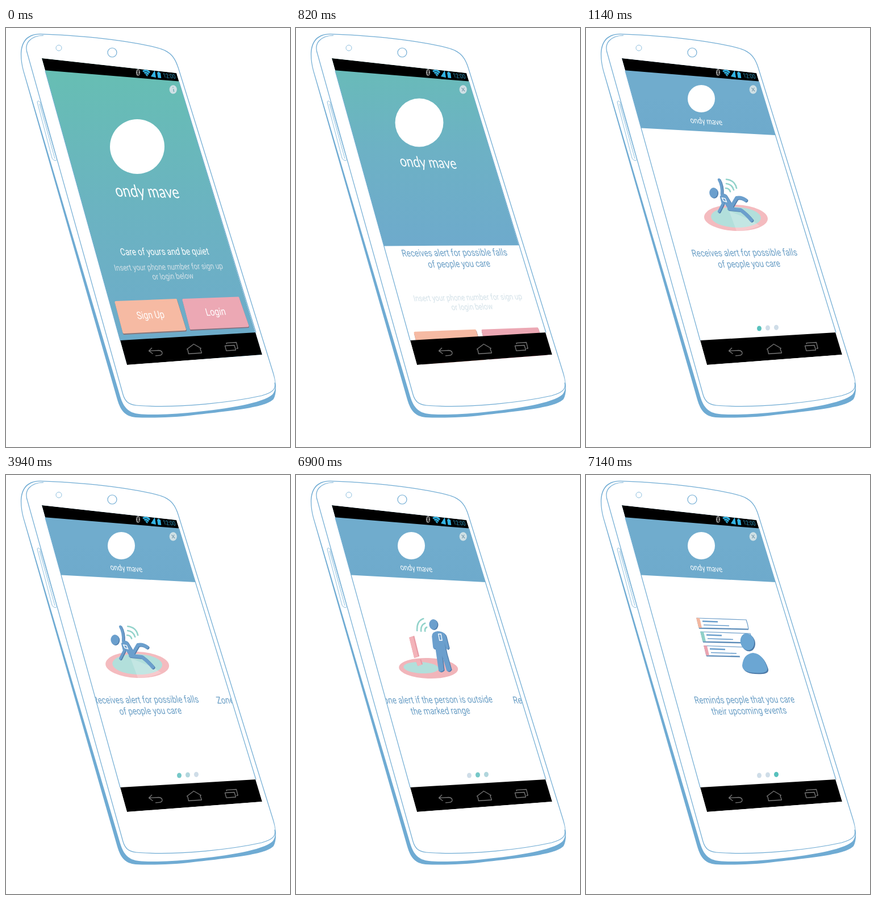
These frames come from a looping animation (500x735 px, 8 s). An HTML page:

```html
<!DOCTYPE html>
<html lang="en">
<head>
<meta charset="utf-8">
<title>Care app tour</title>
<style>
  html, body { margin: 0; height: 100%; overflow: hidden; background: #fff; }
  svg { display: block; width: 100vw; height: 100vh; }
  text { font-family: Roboto, "Open Sans", sans-serif; text-anchor: middle; }
  .line { fill: none; stroke: #6fabd3; stroke-width: 1.2; }
  .thin { fill: #fff; stroke: #8fc0df; stroke-width: 1; }
  .wave { fill: none; stroke: #93d3cb; stroke-width: 2.6; stroke-linecap: round; }
  .nav { fill: none; stroke: #777; stroke-width: 1.3; stroke-linejoin: round; }
  .limb { fill: none; stroke: currentColor; stroke-linecap: round; stroke-linejoin: round; }
  .dark { color: #4d7aa8; }
  .blue { color: #6b9fcd; }
</style>
</head>
<body>
<svg viewBox="0 0 500 735">
  <defs>
    <linearGradient id="sky" x1="0" y1="0" x2="0" y2="1">
      <stop id="skyTop" offset="0"/>
      <stop id="skyMid" offset=".5"/>
      <stop offset="1" stop-color="#6eaacc"/>
    </linearGradient>
    <clipPath id="screen"><path d="M63 53L300 79 451 573 213 591Z"/></clipPath>

    <g id="faller" fill="currentColor">
      <ellipse cx="224.500" cy="289" rx="7.300" ry="9"/>
      <path class="limb" stroke-width="4.500" d="M234 266Q240 276 239 292M238 296L241 308 234 322"/>
      <path class="limb" stroke-width="10.500" d="M243 296L254 314"/>
      <path class="limb" stroke-width="6" d="M255 315L265 298Q273 296 281 302M252 317L272 319Q282 326 291 337"/>
    </g>
    <g id="stander" fill="currentColor">
      <ellipse cx="274.500" cy="262" rx="7.300" ry="9"/>
      <path d="M272 283Q272 275 282 274Q294 274 297 283L302 303Q300 308 297 304L294 294 298 313 306 341Q302 347 298 343L290 317 293 342Q289 347 284 344L279 309 276 293 278 304Q275 307 274 302Z"/>
    </g>
    <g id="bust" fill="currentColor">
      <ellipse cx="284" cy="292.500" rx="12" ry="15" transform="rotate(-14 284 292.500)"/>
      <path d="M275 334Q277 314 294 312Q311 313 319 338Q321 346 309 347Q291 348 282 344Q275 341 275 334Z"/>
    </g>
    <g id="card">
      <path d="M195 251L282 254Q285 262 286 270L199 268Z" fill="#fff" stroke="#6b9cc8" stroke-width="1.200" stroke-linejoin="round"/>
      <path d="M199 269L286 271" stroke="#5585b2" stroke-width="1.600"/>
      <path d="M194 250.500L200 251 204 268 198.500 268Z" fill="currentColor"/>
      <path d="M205 256.500L232 257.500" stroke="#6b9fcd" stroke-width="2.600"/>
      <path d="M207 263L252 264.500" stroke="#6b9fcd" stroke-width="1.600"/>
    </g>
  </defs>

  <!-- phone body -->
  <path fill="#6fabd3" d="M60 10C120 12 205 19 262 33C288 39 297 48 304 70L471 605C477 626 476 642 471 651C458 664 420 669 330 679C290 684 250 684 228 683C210 681 202 672 196 652L30 75C20 36 28 10 60 10Z"/>
  <path fill="#fff" d="M60 11.200C120 13.200 205 20.200 262 34.200C287 40 296 49 303 71L470 606C476 625 475 636 469 643C452 658 390 668 330 674C290 678 255 679 234 677C216 675 207 666 201 646L31.200 75C21.500 38 29 11.600 60 11.200Z"/>
  <path class="line" d="M66 13C42 14 31 27 38 46L206 643C210 657 218 662 236 662.500C310 667 400 656 450 645C468 640 476 634 473 622"/>
  <path class="thin" d="M55 130Q56 126 60 130L89 229Q90 234 85 232Q82 231 81 228Z"/>
  <path class="thin" d="M59 133L86 229"/>
  <circle class="line" cx="187" cy="43" r="8"/>
  <circle class="thin" cx="93" cy="35" r="5"/>

  <!-- screen -->
  <path class="line" d="M69 75L201 548M304.500 94L440 534"/>
  <g clip-path="url(#screen)">
    <g id="page0">
      <ellipse cx="264" cy="333" rx="56" ry="23" fill="#f4bbbf" transform="rotate(2 264 333)"/>
      <ellipse cx="264" cy="332" rx="44" ry="18" fill="#b2dfdb" transform="rotate(2 264 332)"/>
      <path d="M252 321L293 338 306 347Q285 356 265 356Z" fill="#fff" opacity=".22"/>
      <use href="#faller" class="dark" x="1.300" y="1"/>
      <use href="#faller" class="blue"/>
      <path d="M239.500 298L245 299 247.500 305 242 303.500Z" fill="none" stroke="#fff" stroke-width="1.300"/>
      <path class="wave" d="M246 281Q252 281 254 287M247 273Q257 274 260 284M247 265.500Q262 267 265 281"/>
    </g>
    <g id="page1">
      <ellipse cx="266" cy="339" rx="52" ry="18" fill="#f1b5ba" transform="rotate(2 266 339)"/>
      <ellipse cx="253" cy="338" rx="31" ry="10" fill="#b2dfdb" transform="rotate(3 253 338)"/>
      <path d="M232 285L241 282 250 318 241 321ZM244 326L253 323 256 332 247 335Z" fill="#e79ca6"/>
      <path d="M232 285L239 283 248 319 241 321ZM244 326L251 324 254 333 247 335Z" fill="#f3b3b9"/>
      <use href="#stander" class="dark" x="1.500" y="1"/>
      <use href="#stander" class="blue"/>
      <path d="M283.500 279L288 279 290 290 285.500 290Z" fill="none" stroke="#fff" stroke-width="1.300"/>
      <path class="wave" d="M246 273Q245 256 257 252M253 274Q252 263 260 260M260 274Q259 269 263 267"/>
    </g>
    <g id="page2">
      <use href="#card" color="#f4b8a0"/>
      <use href="#card" color="#8fd0c8" x="7" y="24"/>
      <use href="#card" color="#eba3b0" x="13" y="48.500"/>
      <path d="M268 304L304 304 304 324 272 324Z" fill="#fff"/>
      <use href="#bust" class="dark" x="1.800" y="2"/>
      <use href="#bust" color="#6ba6d3"/>
    </g>
    <g id="dots">
      <ellipse cx="305" cy="527" rx="4" ry="4.600"/>
      <ellipse cx="320" cy="526" rx="4" ry="4.600"/>
      <ellipse cx="335" cy="525.300" rx="4" ry="4.600"/>
    </g>

    <path id="panel" fill="url(#sky)"/>
    <g id="logo">
      <circle r="48" fill="#fff"/>
      <text id="word" style="font-family:Lato,sans-serif" font-size="30" fill="#fff">ondy mave</text>
    </g>
    <ellipse cx="294.300" cy="107.800" rx="6.600" ry="7.600" fill="#cfe0e5"/>
    <path id="info" d="M294.800 107L295.600 112M293.900 103.500L294.200 105" stroke="#79b5bb" stroke-width="1.600"/>
    <path id="close" d="M291.500 104.800L297.300 111M296.300 104.800L292.500 111" stroke="#7f9fb0" stroke-width="1.200"/>

    <g id="login" stroke-linejoin="round" stroke-width="4">
      <path d="M194 483L300 479 316 530.500 208 536Z" fill="#86777c" stroke="#86777c"/>
      <path d="M193.500 481L299 477 315 528.500 207.500 534Z" fill="#f6baa3" stroke="#f6baa3"/>
      <path d="M313 479L409 475 426 524 326 529Z" fill="#80707f" stroke="#80707f"/>
      <path d="M312.500 477L408.500 473.500 425.500 522.500 325.500 527Z" fill="#eca8b4" stroke="#eca8b4"/>
    </g>

    <!-- system bars -->
    <path d="M63 53L300 79 304.500 93.500 69 74.300Z"/>
    <path d="M201 548L440 534 451 573 213 591Z"/>
    <ellipse cx="232.500" cy="78" rx="3.600" ry="6" fill="#9a9a9a"/>
    <path d="M230.500 75.500L234.500 80.500 232.700 82.500 232.300 73.500 234.300 75.500 230.700 80.500" fill="none" stroke="#000" stroke-width=".9"/>
    <path d="M240 75Q247 70 254 77L248.500 85Z" fill="#33b5e5"/>
    <path d="M242 78Q247 74 252 80M244.500 81Q247.500 78.500 250 83" fill="none" stroke="#000" stroke-width=".9"/>
    <path d="M255 85L262 74 264 87Z" fill="#33b5e5"/>
    <path d="M266 78L267.500 78 267.500 76.500 270 77 270 78.300 272 78.500 273.300 88 267.500 87.500Z" fill="#33b5e5"/>
    <path class="nav" d="M257 561L251.500 566.500 258.500 571.500M252 566.500L269 565.500Q274.500 566 275 570Q275 574 270 574.300L263 574.800"/>
    <path class="nav" d="M318.500 563.500L330.500 554.500 343.500 562 341.800 562.500 344.500 570 321.500 571.500 319.800 564Z"/>
    <path class="nav" d="M385.500 557.500L402 556.500 404.500 565 388 566.200ZM388.500 554.500L388 552.700 405.500 551.500 408.200 562 405.500 562.300"/>
  </g>
</svg>
<script>
const $ = id => document.getElementById(id);
const START = 500, STEP = 80, LOOP = 8000, PAGE = 224;

// Rows tilt less and less down the screen; glyphs share its foreshortening.
const tilt = y => 0.11 - 0.000345 * (y - 53);
const slant = (x, y, slope = tilt(y)) => `matrix(.787 ${.787 * slope} .28 1 ${x} ${y})`;
const leftX = y => 63 + .279 * (y - 53);
const rightX = y => 300 + .3057 * (y - 79);
const mix = (a, b, p) => a + (b - a) * p;
const mixRgb = (a, b, p) => `rgb(${a.map((v, i) => Math.round(mix(v, b[i], p)))})`;
const ease = p => (1 - Math.cos(Math.PI * p)) / 2;
const clamp = (v, lo, hi) => Math.min(hi, Math.max(lo, v));
const progress = (t, start, count) =>
  clamp(Math.floor((t - start) / STEP) + 1, 0, count) / count;

function label(parent, x, y, size, fill, str) {
  const el = document.createElementNS("http://www.w3.org/2000/svg", "text");
  el.setAttribute("transform", slant(x, y));
  el.setAttribute("font-size", size);
  el.setAttribute("fill", fill);
  el.textContent = str;
  parent.append(el);
}

[
  ["Receives alert for possible falls", "of people you care"],
  ["Zone alert if the person is outside", "the marked range"],
  ["Reminds people that you care", "their upcoming events"]
].forEach(([top, bottom], i) => {
  label($("page" + i), 280.5, 400, 17, "#6b9fc6", top);
  label($("page" + i), 288.5, 419.5, 17, "#6b9fc6", bottom);
});
const login = $("login");
label(login, 280.5, 398, 17, "#fff", "Care of yours and be quiet");
label(login, 287.5, 424, 14.8, "#d3e1e8", "Insert your phone number for sign up");
label(login, 295, 440.5, 14.8, "#d3e1e8", "or login below");
label(login, 256, 509.5, 18, "#fff", "Sign Up");
label(login, 370.5, 504, 18, "#fff", "Login");
label(document.querySelector("svg"), 288.5, 88, 11, "#2b94bb", "12:00");

const TEAL = [102, 191, 178], MID = [107, 179, 193], BLUE = [112, 172, 205];
const ACTIVE = [88, 193, 189], IDLE = [207, 221, 232];
const dots = [...$("dots").children];

function draw(t) {
  const open = progress(t, START, 9);
  const move = ease(open ** 1.18);

  const yl = mix(589, 175.5, move), yr = mix(574, 188, move);
  $("panel").setAttribute("d", `M63 53L300 79L${rightX(yr)} ${yr}L${leftX(yl)} ${yl}Z`);
  $("skyTop").setAttribute("stop-color", mixRgb(TEAL, BLUE, open ** 3));
  $("skyMid").setAttribute("stop-color", mixRgb(MID, BLUE, open ** 2));

  const cy = mix(208, 124, move), size = 1 - .5 * open ** 2.5;
  $("logo").setAttribute("transform", `translate(${mix(231, 203, move)} ${cy}) scale(${size})`);
  $("word").setAttribute("transform", slant(20, 89, tilt(cy + 89 * size)));

  const drop = 174 * open * open;
  login.setAttribute("transform", `translate(${.3 * drop} ${drop})`);
  $("info").style.opacity = open < .3 ? 1 : 0;
  $("close").style.opacity = open < .3 ? 0 : 1;
  $("dots").style.opacity = clamp((open - .6) / .4, 0, 1);

  const first = progress(t, 3940, 4), second = progress(t, 6900, 4);
  const pos = ease(first) + ease(second);
  for (let i = 0; i < 3; i++)
    $("page" + i).setAttribute("transform", `translate(${(i - pos) * PAGE} 0)`);
  [1 - first, first - second, second].forEach((on, i) =>
    dots[i].setAttribute("fill", mixRgb(IDLE, ACTIVE, on)));
}

const begin = performance.now();
function tick() {
  draw((performance.now() - begin) % LOOP);
  requestAnimationFrame(tick);
}
tick();
</script>
</body>
</html>
```
